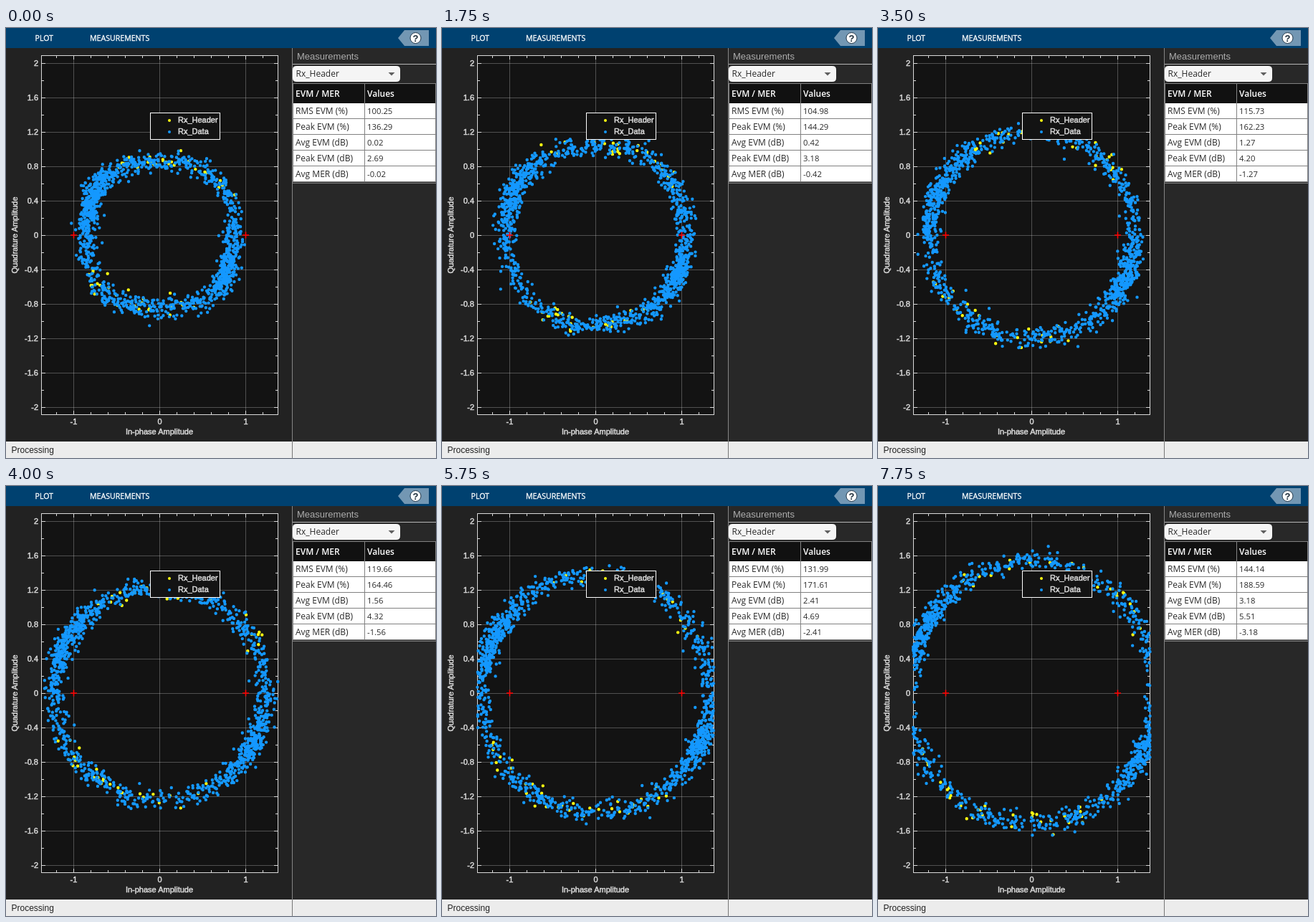
An HTML page with a canvas for the animation above (8000 ms loop, 600 px wide and 600 px high).

```html
<!DOCTYPE html>
<html lang="en">
<head>
<meta charset="utf-8">
<title>Constellation</title>
<style>
html, body { margin: 0; width: 100%; height: 100%; overflow: hidden; background: #222; }
#stage { position: relative; width: 600px; height: 600px; overflow: hidden; }
#stage > * { position: absolute; left: 0; top: 0; }
text { white-space: pre; }
.ui { font-family: "Open Sans", "Noto Sans", sans-serif; font-size: 12px; fill: #2a2a2a; }
.menu { font-size: 10.6px; fill: #fff; stroke: #fff; stroke-width: .3px; }
.head { font-weight: 600; fill: #fff; }
.num { font-size: 11.3px; }
.sans { font-family: "Liberation Sans", Arial, sans-serif; }
.axis { font-size: 11px; fill: #d9d9d9; stroke: #d9d9d9; stroke-width: .5px; }
</style>
</head>
<body>
<div id="stage">
  <svg width="600" height="600">
    <rect width="600" height="600" fill="#222"/>
    <rect width="600" height="28" fill="#004170"/>
    <text class="ui menu" x="40.5" y="18">PLOT</text>
    <text class="ui menu" x="117" y="18">MEASUREMENTS</text>
    <path d="M547 14L556 3H590V25H556Z" fill="#7397b3"/>
    <circle cx="571.5" cy="14" r="7.5" fill="#fff" stroke="#23384a"/>
    <text class="sans" x="571.5" y="18.5" text-anchor="middle" font-size="13" font-weight="bold" fill="#1c2b38">?</text>

    <rect x="49" y="38" width="331" height="502" fill="#131313"/>
    <g id="grid" stroke="#fff" stroke-opacity=".26"></g>
    <g id="ticks" stroke="#d9d9d9"></g>
    <rect x="49.5" y="38.5" width="330" height="501" fill="none" stroke="#d9d9d9"/>
    <g id="labels" class="sans axis"></g>
    <text class="sans axis" x="214" y="567" text-anchor="middle">In-phase Amplitude</text>
    <text class="sans axis" transform="translate(16 289) rotate(-90)" text-anchor="middle">Quadrature Amplitude</text>

    <rect x="400" y="28" width="200" height="549" fill="#282828"/>
    <path d="M399.5 28V577" stroke="#858585"/>
    <text class="sans" x="406" y="44" font-size="13" fill="#adadad">Measurements</text>
    <path d="M400 50.5H600" stroke="#b5b5b5"/>
    <rect x="400.5" y="53.5" width="149" height="21" rx="4" fill="#f5f5f5" stroke="#fff"/>
    <text class="ui" x="404.5" y="68">Rx_Header</text>
    <path d="M533.5 62H542.5L538 66.5Z" fill="#606060"/>
    <rect x="400" y="77" width="200" height="139" fill="#808080"/>
    <rect x="401" y="78" width="198" height="27" fill="#111"/>
    <path d="M500.5 78V105" stroke="#858585"/>
    <text class="ui head" x="404" y="96">EVM / MER</text>
    <text class="ui head" x="504" y="96">Values</text>
    <g id="table"></g>
    <path d="M400 215.5H600" stroke="#303030"/>
    <path d="M400 216.5H600" stroke="#808080"/>

    <rect y="577" width="600" height="23" fill="#ececec"/>
    <path d="M399.5 577V600" stroke="#777"/>
    <text class="sans" x="7.5" y="593" font-size="12" fill="#222">Processing</text>
  </svg>
  <canvas id="dots" width="600" height="600"></canvas>
  <svg width="600" height="600">
    <path d="M90 289H99M94.5 284.5V293.5M330 289H339M334.5 284.5V293.5" stroke="#f00" stroke-width="1.6"/>
    <rect x="201.5" y="118.5" width="97" height="37" fill="#131313" stroke="#fff"/>
    <circle cx="228" cy="129" r="2" fill="#ffff11"/>
    <circle cx="228" cy="145" r="2" fill="#1498ff"/>
    <text class="sans axis" x="240" y="132">Rx_Header</text>
    <text class="sans axis" x="240" y="148">Rx_Data</text>
  </svg>
</div>
<script>
const $ = id => document.getElementById(id);
const STEP = 250, STEPS = 32, TAU = 2 * Math.PI, DEG = Math.PI / 180;
const CX = 214.5, CY = 289, UNIT = 120;

function add(parent, tag, attrs, text = '') {
  const el = document.createElementNS('http://www.w3.org/2000/svg', tag);
  for (const name in attrs) el.setAttribute(name, attrs[name]);
  el.textContent = text;
  parent.append(el);
  return el;
}

// Axes: a tick every 0.2, longer ones carry a grid line and a label
for (let i = -10; i <= 10; i++) {
  const y = CY + .5 - i * UNIT / 5, major = i % 2 === 0, len = major ? 5 : 3;
  add($('ticks'), 'path', { d: `M50 ${y}h${len}M379 ${y}h${-len}` });
  if (!major) continue;
  add($('grid'), 'path', { d: `M50 ${y}H379` });
  add($('labels'), 'text', { x: 45, y: y + 3, 'text-anchor': 'end' }, String(+(i / 5).toFixed(1)));
}
for (let i = -6; i <= 6; i++) {
  const x = CX + i * UNIT / 5, major = i % 5 === 0, len = major ? 5 : 3;
  add($('ticks'), 'path', { d: `M${x} 39v${len}M${x} 539v${-len}` });
  if (!major) continue;
  add($('grid'), 'path', { d: `M${x} 39V539` });
  add($('labels'), 'text', { x, y: 553, 'text-anchor': 'middle' }, String(i / 5));
}

// Measurement table
const names = ['RMS EVM (%)', 'Peak EVM (%)', 'Avg EVM (dB)', 'Peak EVM (dB)', 'Avg MER (dB)'];
const cells = names.map((name, i) => {
  const y = 105 + 22 * i, table = $('table');
  add(table, 'rect', { x: 401, y, width: 99, height: 21, fill: '#fff' });
  add(table, 'rect', { x: 501, y, width: 98, height: 21, fill: '#fff' });
  add(table, 'text', { class: 'ui', x: 404, y: y + 15 }, name);
  return add(table, 'text', { class: 'ui num', x: 504, y: y + 15 });
});

// Values at key steps, linear in between
const keys = [0, 7, 14, 19, 23, 27, 31];
const rms = [100.25, 104.98, 115.73, 125.55, 131.99, 139.73, 144.14];
const peak = [136.29, 144.29, 162.23, 167.80, 171.61, 182.48, 188.59];
const radius = [.885, 1.06, 1.2, 1.29, 1.36, 1.43, 1.485];

function at(values, k) {
  let i = 0;
  while (i < keys.length - 2 && k >= keys[i + 1]) i++;
  const f = (k - keys[i]) / (keys[i + 1] - keys[i]);
  return values[i] + (values[i + 1] - values[i]) * f;
}

function random(seed) {
  return () => {
    seed = seed + 0x6D2B79F5 | 0;
    let t = Math.imul(seed ^ seed >>> 15, 1 | seed);
    t = t + Math.imul(t ^ t >>> 7, 61 | t) ^ t;
    return ((t ^ t >>> 14) >>> 0) / 4294967296;
  };
}

const ctx = $('dots').getContext('2d');

function drawDots(k) {
  const rand = random(k * 977 + 13);
  const gauss = () => Math.sqrt(-2 * Math.log(1 - rand())) * Math.cos(TAU * rand());
  const base = at(radius, k);
  const square = Math.max(0, .035 * (1 - k / 14));
  const oval = Math.max(0, .045 * (k - 15) / 16);

  function scatter(count, color, angle) {
    ctx.fillStyle = color;
    ctx.beginPath();
    for (let i = 0; i < count; i++) {
      const a = angle() + (rand() < .5 ? Math.PI : 0);
      const r = base - square * Math.cos(4 * a) - oval * Math.cos(2 * a) + .06 * gauss();
      const x = CX + UNIT * r * Math.cos(a), y = CY - UNIT * r * Math.sin(a);
      if (x < 49 || x > 379.5) continue;
      ctx.moveTo(x + 2.2, y);
      ctx.arc(x, y, 2.2, 0, TAU);
    }
    ctx.fill();
  }

  ctx.clearRect(0, 0, 600, 600);
  scatter(56, '#ffff11', () => (75 + 100 * (rand() - .5)) * DEG);
  scatter(850, '#1498ff', () => rand() * Math.PI);
  scatter(400, '#1498ff', () => (152 + 14 * gauss()) * DEG);
}

function show(k) {
  const avg = at(rms, k), top = at(peak, k);
  const dB = v => 20 * Math.log10(v / 100);
  [avg, top, dB(avg), dB(top), -dB(avg)].forEach((v, i) => cells[i].textContent = v.toFixed(2));
  drawDots(k);
}

let shown = -1;
function tick() {
  const k = Math.floor(performance.now() / STEP) % STEPS;
  if (k !== shown) show(shown = k);
  requestAnimationFrame(tick);
}
tick();
</script>
</body>
</html>
```
